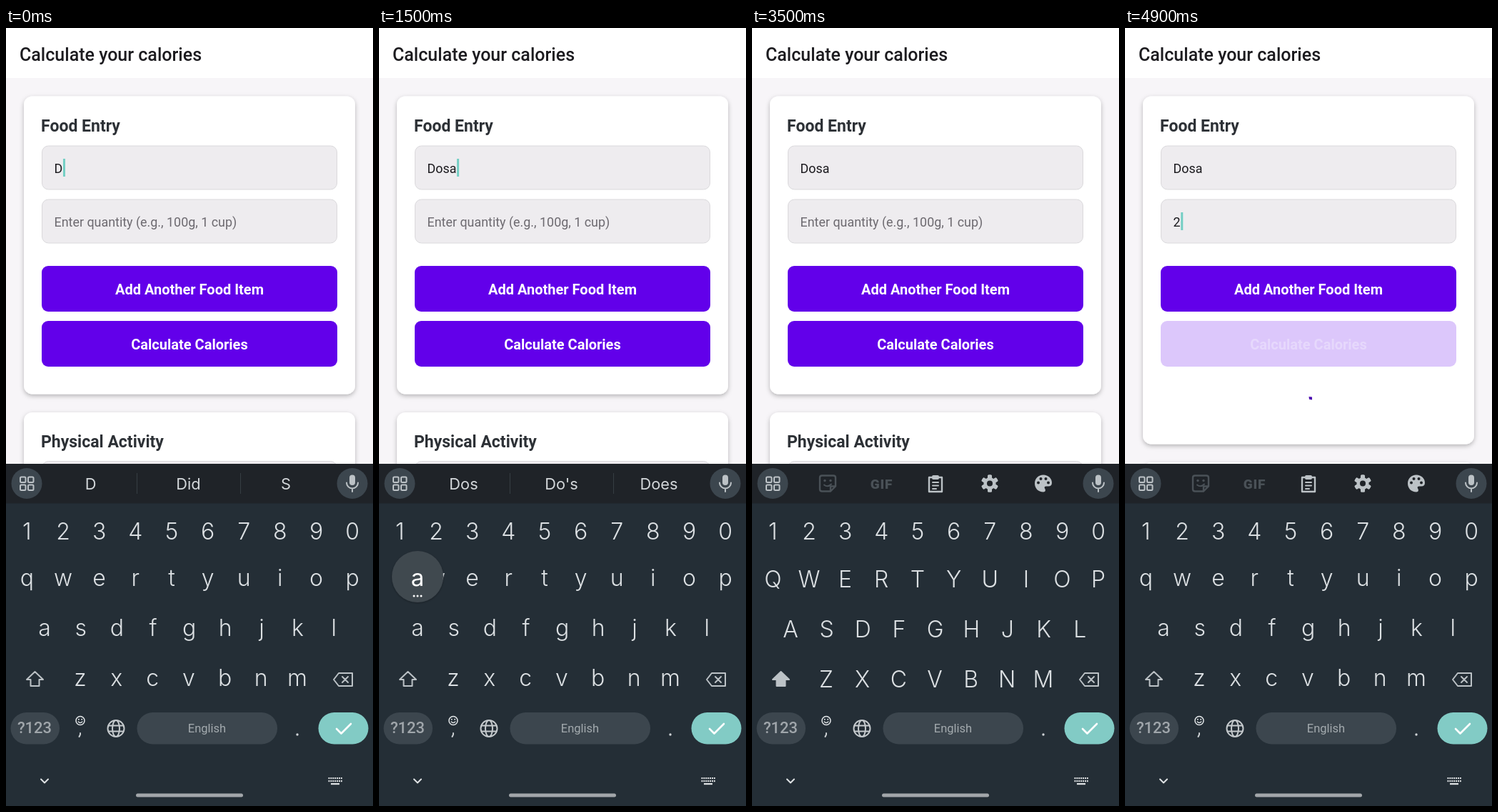
These frames come from a looping animation (514 by 1089 pixels, 5000 ms). An HTML page:

```html
<!DOCTYPE html>
<html lang="en">
<head>
<meta charset="utf-8">
<title>Calorie calculator</title>
<style>
  html, body { margin: 0; width: 100%; height: 100%; overflow: hidden; }
  svg { display: block; width: 100%; height: 100%; }
  text { font-family: Roboto, sans-serif; white-space: pre; }
  .mid { text-anchor: middle; }
  .key, .word { font-family: Inter, Roboto, sans-serif; text-anchor: middle; fill: #dce0e3; }
  .key { font-size: 32px; font-weight: 300; }
  .word { font-size: 21.8px; fill: #d3d7da; }
  .line { fill: none; stroke-width: 2; stroke-linecap: round; stroke-linejoin: round; }
</style>
</head>
<body>
<svg id="stage" viewBox="0 0 514 1089" preserveAspectRatio="none"></svg>
<script>
const LOOP = 5000;
const PURPLE = '#6200ea', PILL = '#3c464e', BOARD = '#242e36', STRIP = '#1f2328', ICON = '#bcc2c6', DIM = '#4a5157';
const TEXT_X = 67.5;

// Each step overrides the state that came before it.
const STEPS = [
  { at: 0, food: 'D', qty: '', focus: 'food', caret: true, words: ['D', 'Did', 'S'], caps: false, button: 1, loading: false },
  { at: 500, caret: false },
  { at: 900, popup: 'o', dim: 'o' },
  { at: 1000, food: 'Do', caret: true, popup: '', dim: '', words: ['Do', "Don't", 'Does'] },
  { at: 1200, popup: 's', dim: 's' },
  { at: 1300, food: 'Dos', popup: '', dim: '', words: ['Dos', "Do's", 'Does'] },
  { at: 1400, popup: 'a', dim: 'a' },
  { at: 1500, food: 'Dosa', dim: '' },
  { at: 1600, popup: '', words: ['Dosa', 'Disa', 'Dosage'] },
  { at: 2100, caret: false },
  { at: 2600, caret: true },
  { at: 3000, focus: 'qty', words: null },
  { at: 3100, caps: true },
  { at: 3500, caret: false },
  { at: 3700, popup: '2', dim: '2' },
  { at: 3800, qty: '2', caret: true, popup: '', dim: '', caps: false },
  { at: 4300, caret: false },
  { at: 4800, caret: true, button: 0.6 },
  { at: 4900, button: 0.22, loading: true },
];

const ROWS = [
  { chars: '1234567890', x: 29.3, y: 715.5 },
  { chars: 'qwertyuiop', x: 29.3, y: 781 },
  { chars: 'asdfghjkl', x: 54, y: 851 },
  { chars: 'zxcvbnm', x: 104, y: 921 },
];
const PITCH = 50.65;
const keys = ROWS.flatMap(row => [...row.chars].map((char, i) => ({ char, x: row.x + i * PITCH, y: row.y })));

const rect = (x, y, w, h, r, fill, extra = '') =>
  `<rect x="${x}" y="${y}" width="${w}" height="${h}" rx="${r}" fill="${fill}" ${extra}/>`;
const circle = (x, y, r, fill, extra = '') => `<circle cx="${x}" cy="${y}" r="${r}" fill="${fill}" ${extra}/>`;
const text = (x, y, size, weight, fill, body, extra = '') =>
  `<text x="${x}" y="${y}" font-size="${size}" font-weight="${weight}" fill="${fill}" ${extra}>${body}</text>`;
const line = (d, stroke, extra = '') => `<path class="line" d="${d}" stroke="${stroke}" ${extra}/>`;
const place = (x, y, body) => `<g transform="translate(${x} ${y})">${body}</g>`;
const repeat = (n, make) => Array.from({ length: n }, (_, i) => make(i)).join('');

const card = (id, y, h) => rect(25, y, 464, h, 12, '#fff', `id="${id}" filter="url(#lift)"`);
const field = (y, id) =>
  rect(50.5, y, 413, 61, 9, '#eeecef', 'stroke="#dad9dc"') + text(TEXT_X, y + 37.5, 17.9, 400, '#1c1b1f', '', `id="${id}"`);
const button = (y, label, ids = ['', '']) =>
  rect(50, y, 414, 64, 9, PURPLE, ids[0]) + text(257, y + 40, 20, 700, '#fff', label, `class="mid" ${ids[1]}`);

const page = () => `
  ${rect(0, 0, 514, 1089, 0, '#f7f5f8')}
  ${rect(0, 0, 514, 70, 0, '#fff')}
  ${text(19, 46, 25, 500, '#1c1b1f', 'Calculate your calories')}
  ${card('foodCard', 95.5, 417)}
  ${text(49, 145, 23, 700, '#2d3136', 'Food Entry')}
  ${field(165, 'food')}
  ${field(240, 'qty')}
  ${rect(0, 0, 3, 25, 0, '#74cfc4', 'id="caret"')}
  ${button(333, 'Add Another Food Item')}
  ${button(410, 'Calculate Calories', ['id="calcFill"', 'id="calcText"'])}
  <path id="spinner" d="M257.5 516l4.500.5v4l-4-.8z" fill="#4b0bb0"/>
  <g id="activity">
    ${card('activityCard', 538, 300)}
    ${text(49, 586.5, 23, 700, '#2d3136', 'Physical Activity')}
    ${rect(50.5, 606.5, 413, 61, 9, '#eeecef', 'stroke="#dad9dc"')}
  </g>`;

const sticker = place(106, 637.5, line('M-8 -11H8Q11 -11 11 -8V4L4 11H-8Q-11 11 -11 8V-8Q-11 -11 -8 -11ZM11 4H4V11', DIM, 'style="stroke-width:2.4"') +
  circle(-4, -4, 1.7, DIM) + circle(4, -4, 1.7, DIM) + line('M-5 2Q0 6 5 1', DIM));
const clipboard = place(257, 638, line('M-9 -9H9V11H-9Z', ICON, 'style="stroke-width:2.4"') +
  rect(-5, -12, 10, 6, 2, ICON) + line('M-4 -2H4M-4 2.500H4M-4 7H1', ICON));
const gear = place(333, 637.5, repeat(6, i => rect(-3, -12, 6, 24, 1.5, ICON, `transform="rotate(${i * 60})"`)) +
  circle(0, 0, 8.6, ICON) + circle(0, 0, 4, STRIP));
const palette = place(408, 637.5, `<path d="M0 -12C-7 -12 -12 -7 -12 0S-7 12 0 12C4 12 3 8 2 7C1 5 2 4 4 4H7Q12 4 12 -1C12 -7 7 -12 0 -12Z" fill="${ICON}"/>` +
  [[-7, -1], [-3.5, -6.5], [3.5, -6.5], [7, -1]].map(([x, y]) => circle(x, y, 2, STRIP)).join(''));

const strip = () => `
  ${rect(0, 610, 514, 55.5, 0, STRIP)}
  ${circle(29, 637.5, 21.5, PILL)}
  ${repeat(4, i => rect(20 + (i % 2) * 11, 628.5 + (i >> 1) * 11, 7.5, 7.5, 1.5, 'none', `stroke="${ICON}" stroke-width="2"`))}
  ${circle(485, 637.5, 21.5, PILL)}
  ${rect(481, 625.5, 8, 14.5, 4, ICON)}
  ${line('M477 636.500a8 8 0 0 0 16 0M485 644.500V649', ICON)}
  <g id="suggestions">
    ${[183.5, 328.5].map(x => rect(x - 0.5, 623, 1, 29, 0, '#363d43')).join('')}
    ${[118.5, 255.5, 392].map((x, i) => `<text class="word" id="word${i}" x="${x}" y="645.500"></text>`).join('')}
  </g>
  <g id="tools">
    ${sticker}${clipboard}${gear}${palette}
    ${text(181.5, 644.5, 19, 900, DIM, 'GIF', 'class="mid" letter-spacing=".8"')}
  </g>`;

const smiley = place(104, 969.5, circle(0, 0, 6, 'none', 'stroke="#e3e7e9" stroke-width="1.5"') +
  circle(-2.2, -1.7, 1, '#e3e7e9') + circle(2.2, -1.7, 1, '#e3e7e9') + line('M-2.800 1.500Q0 4.500 2.800 1.500', '#e3e7e9', 'style="stroke-width:1.4"'));
const globe = place(154, 980.5, line('M-11.500 0a11.500 11.500 0 1 0 23 0a11.500 11.500 0 1 0 -23 0M-5 0a5 11.500 0 1 0 10 0a5 11.500 0 1 0 -10 0M-10.500 -4H10.500M-10.500 4H10.500', '#c5cacd'));

const keyboard = () => `
  ${rect(0, 665, 514, 424, 0, BOARD)}
  ${strip()}
  ${keys.map((key, i) => `<text class="key" id="key${i}" x="${key.x}"></text>`).join('')}
  ${line('M40.500 901L52 912H46.500V921H34.500V912H29Z', ICON, 'id="shift"')}
  ${place(472, 912, line('M-13 0L-6 -9H13V9H-6ZM-1 -4L7 4M7 -4L-1 4', ICON))}
  ${rect(6.500, 958, 68.500, 44.500, 22.200, PILL)}
  ${text(40, 987, 22, 500, '#a0a6ab', '?123', 'class="mid"')}
  ${smiley}${globe}
  ${line('M104 987V989L102.500 992', '#c9cdd0')}
  ${rect(183.500, 958, 196.500, 44.500, 22.200, PILL)}
  ${text(281.500, 986, 16.500, 400, '#a3aaae', 'English', 'class="mid"')}
  ${circle(408, 989, 1.700, '#cfd3d6')}
  ${rect(437.500, 958, 70, 44.500, 22.200, '#82cbc5')}
  ${line('M463 981L469.500 987.500L483 974', '#fff', 'style="stroke-width:2.6"')}
  ${line('M49 1051.500L54 1056.500L59 1051.500', '#e0e3e5')}
  ${repeat(14, i => rect(451.500 + (i % 7) * 2.900, 1049 + (i / 7 | 0) * 4, 1.900, 2.200, 0, '#dfe2e4'))}
  ${rect(455, 1057, 12, 2.200, 0, '#dfe2e4')}
  ${rect(182, 1071.500, 150, 5, 2.500, '#a2a6aa')}
  <g id="popup">
    ${circle(0, 0, 36, '#40484f', 'filter="url(#soft)"')}
    <text class="key" id="popupChar" style="fill:#fff;font-size:33px;font-weight:400"></text>
    ${[-5, 0, 5].map(x => circle(x, 27, 1.500, '#fff')).join('')}
  </g>`;

const stage = document.getElementById('stage');
stage.innerHTML = `
  <defs>
    <filter id="lift" x="-5%" y="-5%" width="110%" height="112%"><feDropShadow dx="0" dy="2.500" stdDeviation="3" flood-opacity=".27"/></filter>
    <filter id="soft" x="-20%" y="-20%" width="140%" height="140%"><feDropShadow dx="0" dy="1" stdDeviation="1.500" flood-opacity=".3"/></filter>
  </defs>${page()}${keyboard()}`;

const el = id => document.getElementById(id);
const show = (id, on) => el(id).setAttribute('visibility', on ? 'visible' : 'hidden');
const set = (id, attrs) => Object.entries(attrs).forEach(([name, value]) => el(id).setAttribute(name, value));

function updatePage(state) {
  el('food').textContent = state.food;
  el('qty').textContent = state.qty || 'Enter quantity (e.g., 100g, 1 cup)';
  set('qty', { fill: state.qty ? '#1c1b1f' : '#6d6a70' });
  const value = state[state.focus];
  const width = value ? el(state.focus).getComputedTextLength() : 0;
  set('caret', { x: TEXT_X + width + 0.7, y: state.focus === 'food' ? 183 : 258 });
  show('caret', state.caret);
  set('calcFill', { opacity: state.button });
  set('calcText', { opacity: state.loading ? 0.3 : state.button });
  set('foodCard', { height: state.loading ? 487 : 417 });
  set('activity', { transform: `translate(0 ${state.loading ? 70 : 0})` });
  show('spinner', state.loading);
}

function updateKeyboard(state) {
  show('suggestions', state.words);
  show('tools', !state.words);
  (state.words || []).forEach((word, i) => { el('word' + i).textContent = word; });
  keys.forEach(({ char, y }, i) => {
    const raised = state.caps && /[a-z]/.test(char);
    el('key' + i).textContent = raised ? char.toUpperCase() : char;
    set('key' + i, { y: raised ? y + 2 : y, opacity: char === state.dim ? 0.3 : 1 });
  });
  el('shift').style.fill = state.caps ? ICON : 'none';
  const key = keys.find(k => k.char === state.popup);
  show('popup', key);
  if (key) {
    set('popup', { transform: `translate(${key.x} ${key.y - 83})` });
    set('popupChar', { y: /\d/.test(key.char) ? 15 : 13 });
    el('popupChar').textContent = key.char;
  }
}

let shown = -1;
function render(now) {
  const time = now % LOOP;
  const past = STEPS.filter(step => step.at <= time);
  if (past.length !== shown) {
    const state = Object.assign({}, ...past);
    updatePage(state);
    updateKeyboard(state);
    shown = past.length;
  }
}

const start = performance.now();
function tick() {
  render(performance.now() - start);
  requestAnimationFrame(tick);
}
tick();
</script>
</body>
</html>
```
